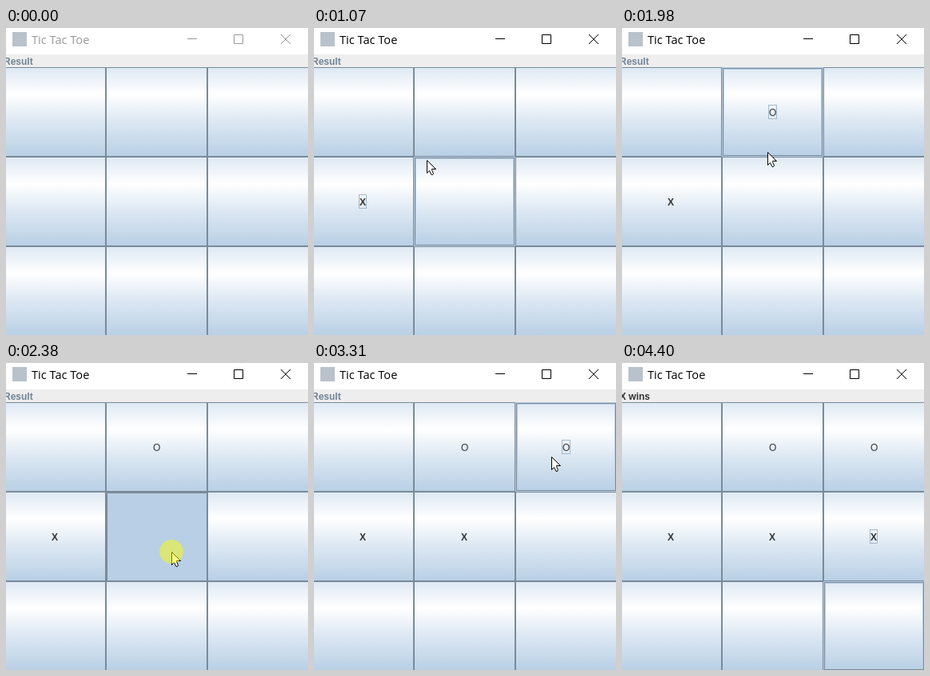
Animation, 378 px wide and 384 px high, one loop 4480 ms. Source, as an HTML page:

```html
<!DOCTYPE html>
<html lang="en">
<head>
<meta charset="utf-8">
<title>Tic Tac Toe</title>
<style>
  html, body { margin: 0; width: 100%; height: 100%; overflow: hidden; background: #fff; }
  svg { display: block; width: 378px; height: 384px; }
  .title { font: 14.6px "Open Sans", "Noto Sans", sans-serif; }
  .label { font: bold 12px "Liberation Sans", Arial, sans-serif; }
</style>
</head>
<body>
<svg id="stage" viewBox="0 0 378 384" xmlns="http://www.w3.org/2000/svg">
  <defs>
    <linearGradient id="face" x1="0" y1="0" x2="0" y2="1">
      <stop offset="0" stop-color="#dde8f3"/>
      <stop offset=".3" stop-color="#fff"/>
      <stop offset=".6" stop-color="#dde8f3"/>
      <stop offset="1" stop-color="#b8cfe5"/>
    </linearGradient>
  </defs>
  <rect width="378" height="384" fill="#fff"/>
  <rect x="8" y="5" width="18" height="18" fill="#b9c2ca"/>
  <text id="title" class="title" x="32" y="20">Tic Tac Toe</text>
  <path id="controls" d="M227 13.5H239M285.5 8.5H296.5V19.5H285.5ZM344 8L356 20M356 8L344 20" fill="none"/>
  <rect y="33" width="378" height="16" fill="#eee"/>
  <text id="result" class="label" x="-3" y="46"></text>
  <g id="board"></g>
  <g id="pointer">
    <path d="M.5 .5V16.5L3.5 13.5 6 18.5H7.5L8.5 17 6.5 12.5V11.5H11.5Z" fill="#fff" stroke="#000"/>
    <circle id="halo" r="15" fill="#ff0" fill-opacity=".48"/>
  </g>
</svg>
<script>
const LOOP = 4480, STEP = 77.5, FIRST = 200;
const CELL_W = 127, CELL_H = 112, LEFT = -2, TOP = 49;
const DARK = '#7a8a99', LIGHT = '#b8cfe5';

// Pointer strokes; it rests where each one ends
const strokes = [
  { from: 130, to: 600, x: 93, y: 234 },
  { from: 820, to: 1440, x: 172, y: 121 },
  { from: 1830, to: 2290, x: 207, y: 236 },
  { from: 2690, to: 2990, x: 294, y: 119 },
  { from: 2990, to: 3140, x: 297, y: 117 },
  { from: 3455, to: 3680, x: 310, y: 203 },
  { from: 4235, to: 4385, x: 340, y: 384 }
];

// X and O take turns
const turns = [
  { cell: 3, down: 610, up: 690 },
  { cell: 1, down: 1600, up: 1680 },
  { cell: 4, down: 2380, up: 2460 },
  { cell: 2, down: 3240, up: 3310 },
  { cell: 5, down: 3990, up: 4010 }
].map((turn, i) => ({ ...turn, mark: 'XO'[i % 2] }));

const $ = id => document.getElementById(id);
const easeOut = p => 1 - (1 - p) ** 2;

function set(el, attrs) {
  for (const key in attrs) el.setAttribute(key, attrs[key]);
}

function add(parent, tag, attrs) {
  const el = document.createElementNS('http://www.w3.org/2000/svg', tag);
  set(el, attrs);
  return parent.appendChild(el);
}

function show(el, on) {
  el.setAttribute('visibility', on ? 'visible' : 'hidden');
}

function frame(parent, inset, stroke) {
  return add(parent, 'rect', {
    x: inset + .5, y: inset + .5, fill: 'none', stroke,
    width: CELL_W - 1 - 2 * inset, height: CELL_H - 1 - 2 * inset
  });
}

const cells = Array.from({ length: 9 }, (_, i) => {
  const x = LEFT + i % 3 * CELL_W, y = TOP + Math.floor(i / 3) * CELL_H;
  const g = add($('board'), 'g', { transform: `translate(${x} ${y})` });
  const face = add(g, 'rect', { width: CELL_W, height: CELL_H });
  const edge = frame(g, 0, DARK);
  const glow = add(g, 'g', {});
  frame(glow, 1, DARK);
  frame(glow, 2, LIGHT);
  const dent = add(g, 'path', { d: `M1.5 ${CELL_H}V1.5H${CELL_W}`, fill: 'none', stroke: DARK });
  const focus = add(g, 'rect', { x: 58.5, y: 47.5, height: 17, fill: 'none', stroke: '#a3b8cc' });
  const text = add(g, 'text', { class: 'label', x: 59, y: 61, fill: '#333' });
  return { face, edge, glow, dent, focus, text };
});

function pointerAt(t) {
  const now = FIRST + Math.floor((t - FIRST) / STEP) * STEP;
  let x = 60, y = 420;
  for (const s of strokes) {
    const p = easeOut(Math.min(1, Math.max(0, (now - s.from) / (s.to - s.from))));
    x += (s.x - x) * p;
    y += (s.y - y) * p;
  }
  return [Math.round(x), Math.round(y)];
}

function cellAt(x, y) {
  const col = Math.floor((x - LEFT) / CELL_W), row = Math.floor((y - TOP) / CELL_H);
  return row < 0 || row > 2 ? -1 : row * 3 + col;
}

function draw(t) {
  const [x, y] = pointerAt(t);
  const hover = cellAt(x, y);
  const turn = turns.filter(m => m.down <= t).pop();
  const pressed = turn && t < turn.up;
  const won = t >= turns[turns.length - 1].up;
  const ink = turn ? '#000' : '#999';

  set($('title'), { fill: ink });
  set($('controls'), { stroke: ink });
  set($('result'), { fill: won ? '#333' : '#708294' });
  $('result').textContent = won ? 'X wins' : 'Result';

  cells.forEach((c, i) => {
    const held = pressed && turn.cell === i;
    const over = hover === i && !held;
    const played = turns.find(m => m.cell === i && m.up <= t);
    const mark = played ? played.mark : '';
    set(c.face, { fill: held ? LIGHT : 'url(#face)' });
    set(c.edge, { stroke: over ? LIGHT : DARK });
    set(c.focus, { width: mark === 'O' ? 10 : 9 });
    show(c.glow, over);
    show(c.dent, held);
    show(c.focus, played && played === turn);
    c.text.textContent = mark;
    c.text.style.fontWeight = mark === 'O' ? 'normal' : 'bold';
  });

  set($('pointer'), { transform: `translate(${x} ${y})` });
  show($('halo'), pressed);
}

const start = performance.now();
function tick(now) {
  draw(Math.max(0, now - start) % LOOP);
  requestAnimationFrame(tick);
}
draw(0);
requestAnimationFrame(tick);
</script>
</body>
</html>
```
